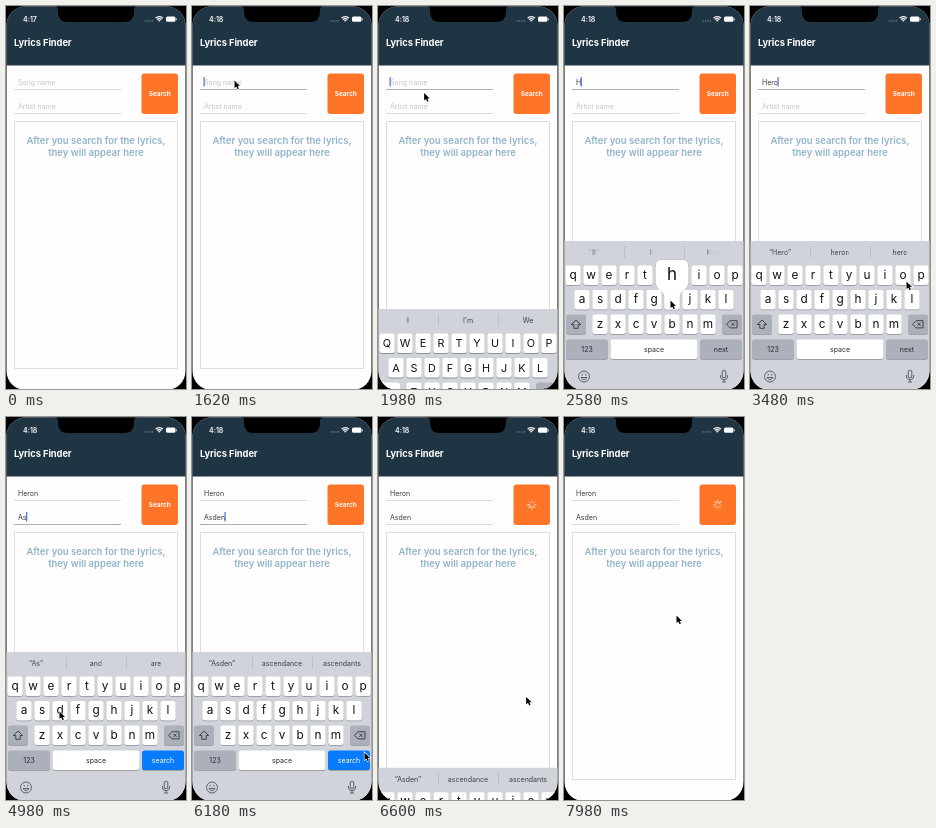
These frames come from a looping animation (180 px wide and 383 px high, 8 s). An HTML page with a canvas:

```html
<!DOCTYPE html>
<html lang="en">
<head>
<meta charset="utf-8">
<title>Lyrics Finder</title>
<style>
  html, body { margin: 0; overflow: hidden; background: #000; }
  canvas { display: block; }
</style>
</head>
<body>
<canvas id="stage" width="180" height="383"></canvas>
<script>
const ctx = document.getElementById('stage').getContext('2d');
const LOOP = 8000, TAU = Math.PI * 2;
const TAP_LENGTH = 100, TYPE_DELAY = 50;
const KEY_ROWS = [['qwertyuiop', 9, 259.5], ['asdfghjkl', 18, 284], ['zxcvbnm', 36, 308.5]];

// [time, key]
const taps = [
  [2530, 'h'], [2890, 'e'], [3070, 'r'], [3260, 'o'], [3670, 'n'], [4000, 'next'],
  [4560, 'a'], [4760, 's'], [5060, 'd'], [5400, 'e'], [5890, 'n'], [6260, 'search'],
];

// [time, x, y] of the pointer tip
const pointerPath = [
  [200, 182, 178], [660, 147, 138], [960, 147, 138], [1140, 42, 74], [1900, 42, 74],
  [2460, 106, 294], [2660, 106, 294], [2870, 45, 271], [2940, 45, 271], [3060, 62, 272],
  [3110, 62, 272], [3250, 156, 275], [3490, 156, 275], [3660, 126, 318], [3740, 126, 318],
  [3980, 158, 341], [4100, 158, 341], [4520, 18, 294], [4630, 18, 294], [4740, 36, 294],
  [4810, 36, 294], [4930, 53, 294], [5140, 53, 294], [5380, 45, 271], [5470, 45, 271],
  [5860, 126, 318], [5950, 126, 318], [6160, 172, 335], [6400, 172, 335], [6860, 112, 198],
];

const guesses = {
  H: ['he', 'how'], He: ['hey', 'her'], Her: ['here', 'hers'], Hero: ['heron', 'hero'],
  Heron: ['herons', 'heroic'], A: ['and', 'are'], As: ['and', 'are'], Asd: ['add', 'sad'],
  Asde: ['aside', 'ascend'], Asden: ['ascendance', 'ascendants'],
};

const clamp = v => Math.min(1, Math.max(0, v));
const smooth = v => v * v * (3 - 2 * v);

function text(str, x, y, size, color, weight = 400, align = 'left') {
  ctx.font = `${weight} ${size}px Inter, sans-serif`;
  ctx.textAlign = align;
  ctx.fillStyle = color;
  ctx.fillText(str, x, y);
}

function box(x, y, w, h, r, color) {
  ctx.beginPath();
  ctx.roundRect(x, y, w, h, r);
  ctx.fillStyle = color;
  ctx.fill();
}

function shape(path, { fill, stroke, width = 1 }, x = 0, y = 0) {
  ctx.save();
  ctx.translate(x, y);
  const p = new Path2D(path);
  if (stroke) { ctx.strokeStyle = stroke; ctx.lineWidth = width; ctx.stroke(p); }
  if (fill) { ctx.fillStyle = fill; ctx.fill(p); }
  ctx.restore();
}

function suggestions(word) {
  return word ? [`“${word}”`, ...guesses[word]] : ['I', 'I\'m', 'We'];
}

function stateAt(t) {
  const s = { fields: ['', ''], active: t >= 1500 ? 0 : -1, loading: false,
              changed: -1000, previous: '', pressed: '' };
  for (const [time, key] of taps) {
    if (t >= time && t < time + TAP_LENGTH) s.pressed = key;
    if (t < time + TYPE_DELAY) continue;
    if (key === 'search') { s.loading = true; continue; }
    s.previous = s.fields[s.active];
    s.changed = time;
    if (key === 'next') s.active = 1;
    else s.fields[s.active] += s.previous ? key : key.toUpperCase();
  }
  s.word = s.fields[Math.max(0, s.active)];
  if (s.loading) s.focus = -1;
  else s.focus = s.active;
  return s;
}

function drawStatus(t) {
  text(t < 1020 ? '4:17' : '4:18', 17, 16, 7, '#fff', 600);
  for (let i = 0; i < 4; i++) box(138.5 + i * 2.4, 14.2, 1.4, 1.4, .7, '#7f8c95');
  for (const r of [1.2, 3.2, 5.2]) {
    ctx.beginPath();
    ctx.arc(153.3, 15.8, r, -Math.PI * .75, -Math.PI * .25);
    ctx.strokeStyle = '#fff';
    ctx.lineWidth = 1.4;
    ctx.stroke();
  }
  box(160, 10.5, 9.5, 5.3, 1.5, '#fff');
  box(170, 12.2, 1, 2, .5, '#b8c0c5');
}

function drawField(label, value, y, focused, caret) {
  text(value || label, 12, y + 2.5, 7, value ? '#3a3a3c' : '#c3c3c7');
  const end = 12 + (value ? ctx.measureText(value).width : 0);
  box(8, y + 7, 107, 1, 0, focused ? '#a9b1b6' : '#dcdcde');
  if (caret) box(end - .5, y - 5, 1.2, 9.5, .5, '#4274d8');
}

function drawSpinner(t) {
  ctx.lineCap = 'round';
  ctx.lineWidth = 1.1;
  for (let i = 0; i < 8; i++) {
    const a = i / 8 * TAU, glow = (i / 8 - t / 1000 % 1 + 1) % 1;
    ctx.strokeStyle = `rgba(255,255,255,${.3 + .65 * glow})`;
    ctx.beginPath();
    ctx.moveTo(153.8 + Math.cos(a) * 2.2, 87.7 + Math.sin(a) * 2.2);
    ctx.lineTo(153.8 + Math.cos(a) * 4.2, 87.7 + Math.sin(a) * 4.2);
    ctx.stroke();
  }
  ctx.lineCap = 'butt';
}

function drawApp(t, s) {
  box(0, 0, 180, 383, 0, '#fffdfe');
  box(0, 0, 180, 59.5, 0, '#203544');
  drawStatus(t);
  ctx.letterSpacing = '-0.1px';
  text('Lyrics Finder', 8, 40.3, 9.4, '#fff', 700);
  ctx.letterSpacing = '0px';
  drawField('Song name', s.fields[0], 76, s.focus === 0, s.focus === 0 && t >= 1600);
  drawField('Artist name', s.fields[1], 100, s.focus === 1, s.focus === 1);
  box(135.5, 67.5, 36.5, 40.5, 3, '#ff7426');
  if (s.loading) drawSpinner(t);
  else text('Search', 153.7, 90, 6.4, '#fff', 700, 'center');
  ctx.strokeStyle = '#dcdde0';
  ctx.lineWidth = 1;
  ctx.strokeRect(8.5, 115.5, 163, 247);
  text('After you search for the lyrics,', 90, 138.3, 9.5, '#8fb5ca', 600, 'center');
  text('they will appear here', 90, 150.3, 9.5, '#8fb5ca', 600, 'center');
}

function key(x, y, w, color) {
  box(x, y + .8, w, 19.5, 2.5, '#8e9197');
  box(x, y, w, 19.5, 2.5, color);
}

function drawSuggestions(t, s) {
  const age = t - s.changed, words = suggestions(s.word), mix = clamp(age / 250);
  if (mix < 1) {
    ctx.globalAlpha = 1 - mix;
    text(suggestions(s.previous)[0], 30, 249, 7, '#3c3d40', 400, 'center');
  }
  ctx.globalAlpha = mix;
  text(words[0], 30, 249, 7, '#3c3d40', 400, 'center');
  ctx.globalAlpha = 1;
  // The other words are wiped in from the left with a soft edge.
  const edge = age / 180;
  words.slice(1).forEach((word, i) => {
    const x = 90 + i * 60, half = ctx.measureText(word).width / 2;
    const fade = ctx.createLinearGradient(x - half, 0, x + half, 0);
    fade.addColorStop(clamp(edge - .35), 'rgba(60,61,64,1)');
    fade.addColorStop(clamp(edge), edge < 1.35 ? 'rgba(60,61,64,0.08)' : 'rgba(60,61,64,1)');
    text(word, x, 249, 7, fade, 400, 'center');
  });
  for (const x of [60, 120]) box(x, 240, .7, 12, 0, '#b4b7be');
}

function drawPopup(label, x, y) {
  shape(`M-11-30H11Q16-30 16-25V-7Q16-3 12 0Q7.7 3 7.7 7V17Q7.7 19.5 5 19.5H-5
    Q-7.7 19.5-7.7 17V7Q-7.7 3-12 0Q-16-3-16-7V-25Q-16-30-11-30Z`,
    { fill: '#fff', stroke: 'rgba(90,94,102,.25)', width: .8 }, x, y);
  text(label, x, y - 10.5, 17, '#111', 400, 'center');
}

function drawKeyboard(t, s) {
  const up = 1 - (1 - clamp((t - 1900) / 350)) ** 3;
  const down = smooth(clamp((t - 6380) / 320));
  const shown = up * (1 - down);
  if (!shown) return;
  ctx.save();
  ctx.translate(0, 150 * (1 - shown));
  box(0, 235, 180, 150, 0, '#d0d3da');
  drawSuggestions(t, s);

  const upper = !s.word, grey = '#abb0ba';
  let popup;
  for (const [letters, left, y] of KEY_ROWS) {
    [...letters].forEach((letter, i) => {
      const x = left + i * 18, label = upper ? letter.toUpperCase() : letter;
      key(x - 7.7, y, 15.4, '#fff');
      text(label, x, y + (upper ? 13.7 : 13), upper ? 10.8 : 11.8, '#111', 400, 'center');
      if (s.pressed === letter) popup = [label, x, y];
    });
  }

  key(2, 308.5, 20, upper ? '#fff' : grey);
  shape('M0-4.5L4.6 0H2.2V3.8H-2.2V0H-4.6Z',
    upper ? { fill: '#000' } : { stroke: '#34363a', width: .9 }, 12, 318.5);
  key(158, 308.5, 20, grey);
  shape('M-5.5 0L-2-3.6H5V3.6H-2ZM-.6-1.6L2.6 1.6M2.6-1.6L-.6 1.6',
    { stroke: '#34363a', width: .9 }, 168, 318.3);

  key(2, 333.5, 42, grey);
  text('123', 23, 346, 7, '#26282b', 400, 'center');
  key(46.5, 333.5, 87, '#fff');
  text('space', 90, 345.6, 7, '#26282b', 400, 'center');
  const search = s.active === 1, action = search ? 'search' : 'next';
  const held = s.pressed === action;
  key(136, 333.5, 42, held ? '#fff' : search ? '#087bff' : grey);
  text(action, 157, 345.8, 7, search && !held ? '#fff' : '#26282b', 400, 'center');

  const line = { stroke: '#50545c', width: .9 };
  shape('M5.5 0A5.5 5.5 0 1 1-5.5 0A5.5 5.5 0 1 1 5.5 0M-3 1Q0 5.5 3 1ZM-1.8-2.6V-1M1.8-2.6V-1',
    line, 20, 370.5);
  shape('M-1.8-4A1.8 1.8 0 0 1 1.8-4V0A1.8 1.8 0 0 1-1.8 0ZM-3.7-1V0A3.7 3.7 0 0 0 3.7 0V-1M0 3.7V6M-2 6H2',
    line, 160, 370);
  if (popup) drawPopup(...popup);
  ctx.restore();
}

function drawPointer(t) {
  if (t < pointerPath[0][0]) return;
  const next = pointerPath.findIndex(p => p[0] > t);
  let [, x, y] = pointerPath.at(-1);
  if (next > 0) {
    const [t0, x0, y0] = pointerPath[next - 1], [t1, x1, y1] = pointerPath[next];
    const k = smooth((t - t0) / (t1 - t0));
    x = x0 + (x1 - x0) * k;
    y = y0 + (y1 - y0) * k;
  }
  shape('M.5.5V8L2.3 6.4L3.6 9.2L4.9 8.6L3.7 5.9H6Z',
    { fill: '#000', stroke: '#fff', width: 1.2 }, x, y);
}

function draw(now) {
  const t = now % LOOP, s = stateAt(t);
  box(0, 0, 180, 383, 0, '#000');
  ctx.save();
  ctx.beginPath();
  ctx.roundRect(.5, .5, 179, 383.5, 19);
  ctx.clip();
  drawApp(t, s);
  drawKeyboard(t, s);
  shape('M48 0Q52 0 52 4V6Q52 16 62 16H118Q128 16 128 6V4Q128 0 132 0Z', { fill: '#000' });
  drawPointer(t);
  ctx.restore();
}

const start = performance.now();
(function tick() {
  draw(performance.now() - start);
  requestAnimationFrame(tick);
})();
</script>
</body>
</html>
```
